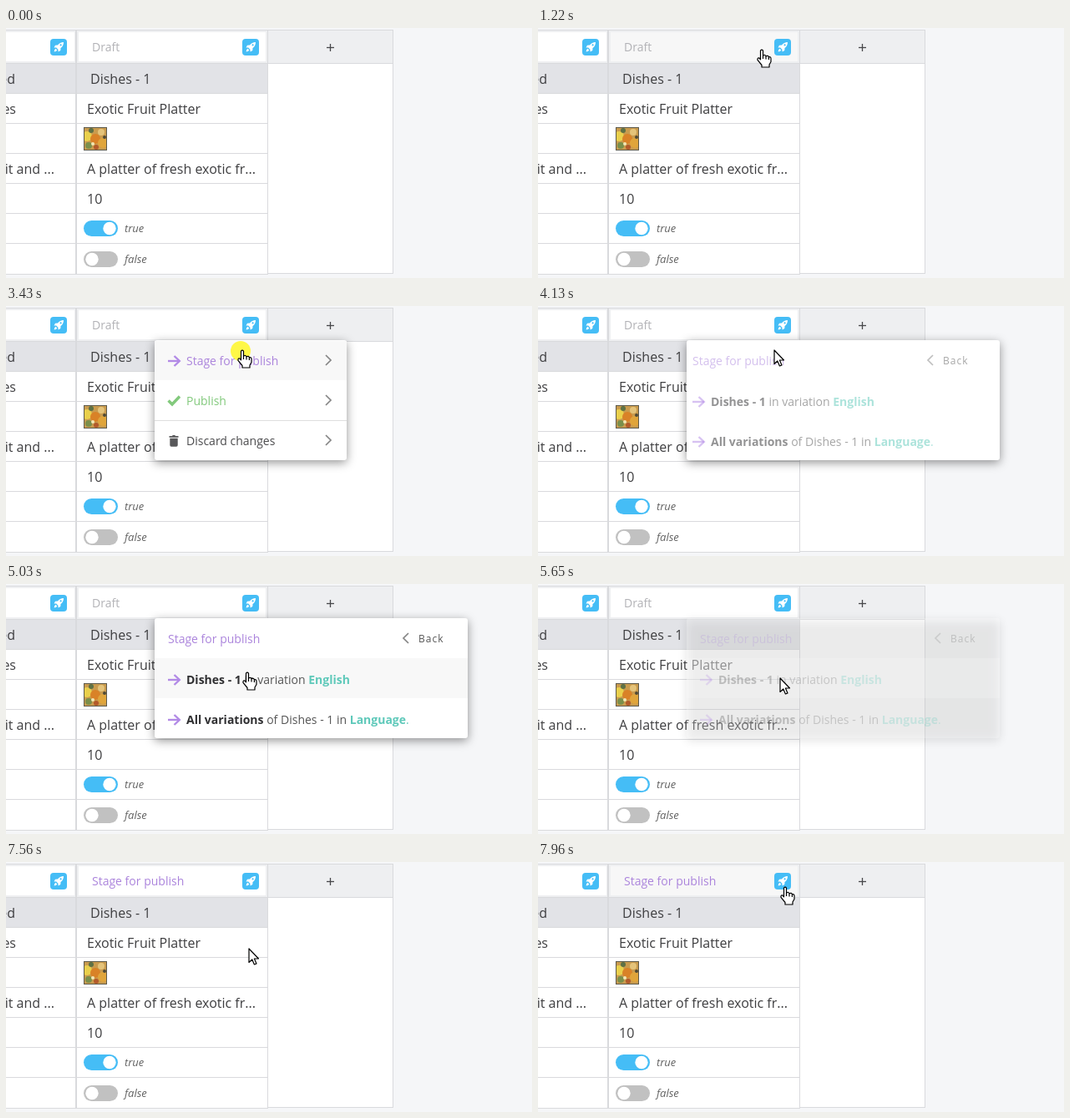
An HTML page with a canvas that plays this animation: 630x300 px, repeating every 8000 ms.

```html
<!DOCTYPE html>
<html lang="en">
<head>
<meta charset="utf-8">
<title>Stage for publish</title>
<style>
html, body { margin: 0; width: 100%; height: 100%; overflow: hidden; background: #f5f6f8; }
canvas { display: block; width: 630px; height: 300px; }
</style>
</head>
<body>
<canvas id="stage" width="630" height="300"></canvas>
<script>
const ctx = document.getElementById('stage').getContext('2d');
const LOOP = 8000;
const FONT = '"Open Sans", sans-serif';
const BLUE = '#45bdf6', PURPLE = '#ab84dc', GREEN = '#82c97c', TEAL = '#5fc9ba', INK = '#3e3e40', LINE = '#d9dadd';

// Screen updates come in bursts: [start, end, count].
const BURSTS = [
  [700, 1320, 7], [1720, 2110, 5], [2510, 2810, 4], [3430, 4330, 10],
  [4730, 5230, 6], [5430, 6150, 8], [6250, 6750, 6], [7560, 7960, 5]
];
const CURSOR = [
  [700, 112, 2], [1320, 281, 28], [2410, 281, 28], [2810, 283, 53], [4630, 283, 53],
  [5030, 289, 106], [5230, 290, 113], [7460, 290, 113], [7960, 296, 30]
];
const CURSOR_KIND = [
  [700, 'arrow'], [1110, 'hand'], [3530, 'arrow'], [4920, 'hand'], [5530, 'arrow'],
  [6150, 'ibeam'], [6640, 'arrow'], [7760, 'hand']
];
const CLICKS = [1720, 3430, 5430];

const HAND = new Path2D('M-1.5 1.2Q0-1 1.5 1.2V7Q4 5.6 5 7.8Q7.4 6.6 8.4 8.8Q11 8 11 11V14.5L9 18V21H0V18.5L-5 12.3Q-5.4 9.4-3 10L-1.5 11.8Z');
const KNUCKLES = new Path2D('M1.5 7V11M5 8V11.5M8.4 9V12');
const ARROW = new Path2D('M0 0V16.5L3.8 13L6.4 19L9 17.9L6.4 12H11.5Z');
const IBEAM = new Path2D('M-3.5-6.5H-1L0-5.8L1-6.5H3.5M0-6V7M-3.5 7.5H-1L0 6.8L1 7.5H3.5');
const ROCKET = new Path2D('M6-6Q1.5-6-1-2.5L-4-2.3L-5.5.4L-2.8.6L-.6 2.8L-.4 5.5L2.3 4L2.5 1Q6-1.5 6-6ZM-3.4 1.8Q-5.2 2.3-5.4 5.4Q-2.3 5.2-1.8 3.4Z');
const TRASH = new Path2D('M-5.5-6H-2L-1.3-7H1.3L2-6H5.5V-4.2H-5.5ZM-4.7-3.2H4.7V5Q4.7 6.7 3 6.7H-3Q-4.7 6.7-4.7 5Z');

function tick(t) {
  const burst = BURSTS.filter(b => b[0] <= t).pop();
  if (!burst) return 0;
  const [start, end, count] = burst;
  const step = (end - start) / (count - 1);
  return start + Math.min(count - 1, Math.floor((t - start) / step + 0.1)) * step;
}

function track(keys, t, column = 1) {
  if (t <= keys[0][0]) return keys[0][column];
  const next = keys.findIndex(k => k[0] > t);
  if (next < 0) return keys[keys.length - 1][column];
  const a = keys[next - 1], b = keys[next];
  const u = (t - a[0]) / (b[0] - a[0]);
  return a[column] + (b[column] - a[column]) * u * u * (3 - 2 * u);
}

const between = (t, from, to) => t >= from && t < to;

function rect(x, y, w, h, color) {
  ctx.fillStyle = color;
  ctx.fillRect(x, y, w, h);
}

function round(x, y, w, h, r, color) {
  ctx.fillStyle = color;
  ctx.beginPath();
  ctx.roundRect(x, y, w, h, r);
  ctx.fill();
}

function dot(x, y, r, color) {
  ctx.fillStyle = color;
  ctx.beginPath();
  ctx.arc(x, y, r, 0, Math.PI * 2);
  ctx.fill();
}

function line(points, color, width) {
  ctx.strokeStyle = color;
  ctx.lineWidth = width;
  ctx.beginPath();
  points.forEach(([x, y]) => ctx.lineTo(x, y));
  ctx.stroke();
}

// Returns the x where the text ends, so that runs can be chained.
function text(str, x, y, size, color, style = '', align = 'left') {
  ctx.font = `${style} ${size}px ${FONT}`;
  ctx.textAlign = align;
  ctx.fillStyle = color;
  ctx.fillText(str, x, y);
  return x + ctx.measureText(str).width;
}

function group(x, y, alpha, draw) {
  ctx.save();
  ctx.translate(x, y);
  ctx.globalAlpha *= alpha;
  draw();
  ctx.restore();
}

function panel(x, y, w, h) {
  ctx.save();
  ctx.shadowColor = 'rgba(0,0,0,.42)';
  ctx.shadowBlur = 12;
  ctx.shadowOffsetY = 3;
  round(x, y, w, h, 3, '#fff');
  ctx.restore();
}

function rocketButton(x, color) {
  round(x, 13, 20, 20, 4, color);
  group(x + 10, 23, 1, () => {
    ctx.fillStyle = '#fff';
    ctx.fill(ROCKET);
    dot(2.6, -2.6, 1.1, color);
  });
}

function toggle(y, on) {
  round(93, y, 41, 19, 9.5, on ? BLUE : '#c1c1c1');
  dot(on ? 124 : 103, y + 9.5, 7.7, '#fff');
  text(on ? 'true' : 'false', 142, y + 14, 13, '#636363', 'italic');
}

function thumbnail() {
  rect(93, 119, 28, 28, '#5d5a4c');
  ctx.save();
  ctx.beginPath();
  ctx.rect(94, 120, 26, 26);
  ctx.clip();
  rect(94, 120, 26, 26, '#c99b4e');
  dot(97, 130, 6, '#e9d04c');
  dot(107, 133, 6, '#d98227');
  dot(116, 138, 6, '#e0a53b');
  dot(102, 123, 3, '#5e7145');
  dot(114, 125, 4, '#e4c37a');
  dot(99, 141, 4, '#7b8f4b');
  dot(108, 143, 3, '#b35a2b');
  dot(104, 139, 2, '#f3e6b4');
  dot(118, 131, 2, '#504a35');
  ctx.restore();
}

function table(t) {
  rect(0, 0, 630, 300, '#f5f6f8');
  rect(0, 2, 464, 293, '#fff');
  rect(0, 2, 464, 41, '#eeeff1');
  rect(0, 43, 313, 35, '#e2e3e7');
  rect(0, 2, 464, 1, LINE);
  rect(0, 42, 464, 1, LINE);
  for (let y = 78; y < 290; y += 36) rect(0, y, 314, 1, LINE);
  rect(0, 295, 314, 1, LINE);
  rect(314, 294, 150, 1, LINE);
  rect(83, 2, 2, 294, LINE);
  rect(313, 2, 1, 294, LINE);
  rect(463, 2, 1, 293, LINE);

  const hovered = between(t, 1000, 2600) || t >= 7760;
  rect(0, 5, 82, 35, '#fff');
  rect(87, 5, 224, 35, hovered ? '#f7f7f7' : '#fff');
  rocketButton(53, BLUE);
  rocketButton(283, between(t, 5730, 6640) ? '#d9d9d9' : BLUE);
  if (t >= 6540) text('Stage for publish', 103, 28, 14, PURPLE);
  else text('Draft', 103, 28, 14, '#b2b2b6');

  line([[384, 23.5], [393, 23.5]], '#47474a', 1.3);
  line([[388.5, 19], [388.5, 28]], '#47474a', 1.3);

  text('ed', 11, 67, 16, INK, '', 'right');
  text('es', 12, 103, 16, INK, '', 'right');
  text('fruit and ...', 58, 175, 16, INK, '', 'right');
  text('Dishes - 1', 101, 67, 16, INK);
  text('Exotic Fruit Platter', 97, 103, 16, INK);
  text('A platter of fresh exotic fr...', 97, 175, 16, INK);
  text('10', 97, 211, 16, INK);
  thumbnail();
  toggle(231, true);
  toggle(268, false);
}

function arrowIcon(y) {
  line([[194, y], [208, y]], '#b28ae6', 2.4);
  line([[201.5, y - 6], [207.8, y], [201.5, y + 6]], '#b28ae6', 2.4);
}

function chevron(x, y, dir) {
  line([[x - 3 * dir, y - 6], [x + 3 * dir, y], [x - 3 * dir, y + 6]], '#858585', 1.7);
}

function actions(t) {
  if (t >= 2700) rect(178, 42, 230, 47, '#f8f8f8');
  arrowIcon(66);
  text('Stage for publish', 216, 71, 14, PURPLE);
  line([[194.5, 113.5], [199, 118], [208, 108.5]], GREEN, 3.4);
  text('Publish', 216, 119, 14, GREEN);
  rect(178, 137, 230, 1, '#dedede');
  group(201, 162, 1, () => {
    ctx.fillStyle = '#58585a';
    ctx.fill(TRASH);
  });
  text('Discard changes', 216, 167, 14, '#4b4b4d');
  [65, 113, 161].forEach(y => chevron(386, y, 1));
}

function stageOptions() {
  text('Stage for publish', 194, 71, 14, PURPLE);
  chevron(479, 65, -1);
  ctx.letterSpacing = '1px';
  text('Back', 494, 70, 12, '#555');
  ctx.letterSpacing = '0px';
  arrowIcon(115);
  arrowIcon(163);
  let x = text('Dishes - 1', 216, 120, 14, '#303032', 'bold');
  x = text(' in variation ', x, 120, 14, '#555');
  text('English', x, 120, 14, TEAL, 'bold');
  x = text('All variations', 216, 168, 14, '#303032', 'bold');
  x = text(' of Dishes - 1 in ', x, 168, 14, '#555');
  x = text('Language', x, 168, 14, TEAL, 'bold');
  text('.', x, 168, 14, TEAL);
}

function menu(t) {
  const alpha = track([[1720, 0], [1915, 0.92], [2110, 1], [5430, 1], [5740, 0]], t);
  if (!alpha) return;
  const width = track([[3630, 230], [4030, 375]], t);
  group(0, 0, alpha, () => {
    panel(178, 41, width, 144);
    ctx.beginPath();
    ctx.rect(178, 41, width, 144);
    ctx.clip();
    if (t >= 5000) rect(178, 89, width, 48, '#f8f8f8');
    const out = track([[3430, 1], [3830, 0]], t);
    const enter = track([[3930, 0], [4130, 0.52], [4330, 1]], t);
    if (out) group((out - 1) * 10, 0, out, () => actions(t));
    if (enter) group(track([[3930, -18], [4130, -9], [4330, 0]], t), 0, enter, stageOptions);
  });
}

function updateDialog(t) {
  const alpha = track([[5740, 0], [6050, 1], [6450, 1], [6740, 0]], t);
  if (!alpha) return;
  group(0, 0, alpha, () => {
    panel(188, 39, 200, 138);
    text('Update', 200, 75, 14, '#5a6173', '600');
    [267, 288, 309].forEach((x, i) => {
      const age = (t - 5850 - i * 300) / 400;
      if (Math.abs(age) < 1) dot(x, 118, 7 * Math.cos(age * Math.PI / 2), '#69c8f9');
    });
  });
}

function cursor(t) {
  if (t < 700) return;
  const kind = CURSOR_KIND.filter(k => k[0] <= t).pop()[1];
  const x = Math.round(track(CURSOR, t, 1)), y = Math.round(track(CURSOR, t, 2));
  if (CLICKS.some(c => between(t, c, c + 60))) dot(x - 2, y + 1, 12, 'rgba(255,246,20,.78)');
  group(x, y, 1, () => {
    ctx.strokeStyle = '#000';
    ctx.lineWidth = 1.2;
    ctx.lineJoin = 'round';
    if (kind === 'ibeam') {
      ctx.stroke(IBEAM);
      return;
    }
    const shape = kind === 'hand' ? HAND : ARROW;
    ctx.fillStyle = '#fff';
    ctx.fill(shape);
    ctx.stroke(shape);
    if (kind === 'hand') ctx.stroke(KNUCKLES);
  });
}

function frame(now) {
  const t = tick(now % LOOP);
  table(t);
  menu(t);
  updateDialog(t);
  cursor(t);
  requestAnimationFrame(frame);
}
requestAnimationFrame(frame);
</script>
</body>
</html>
```
